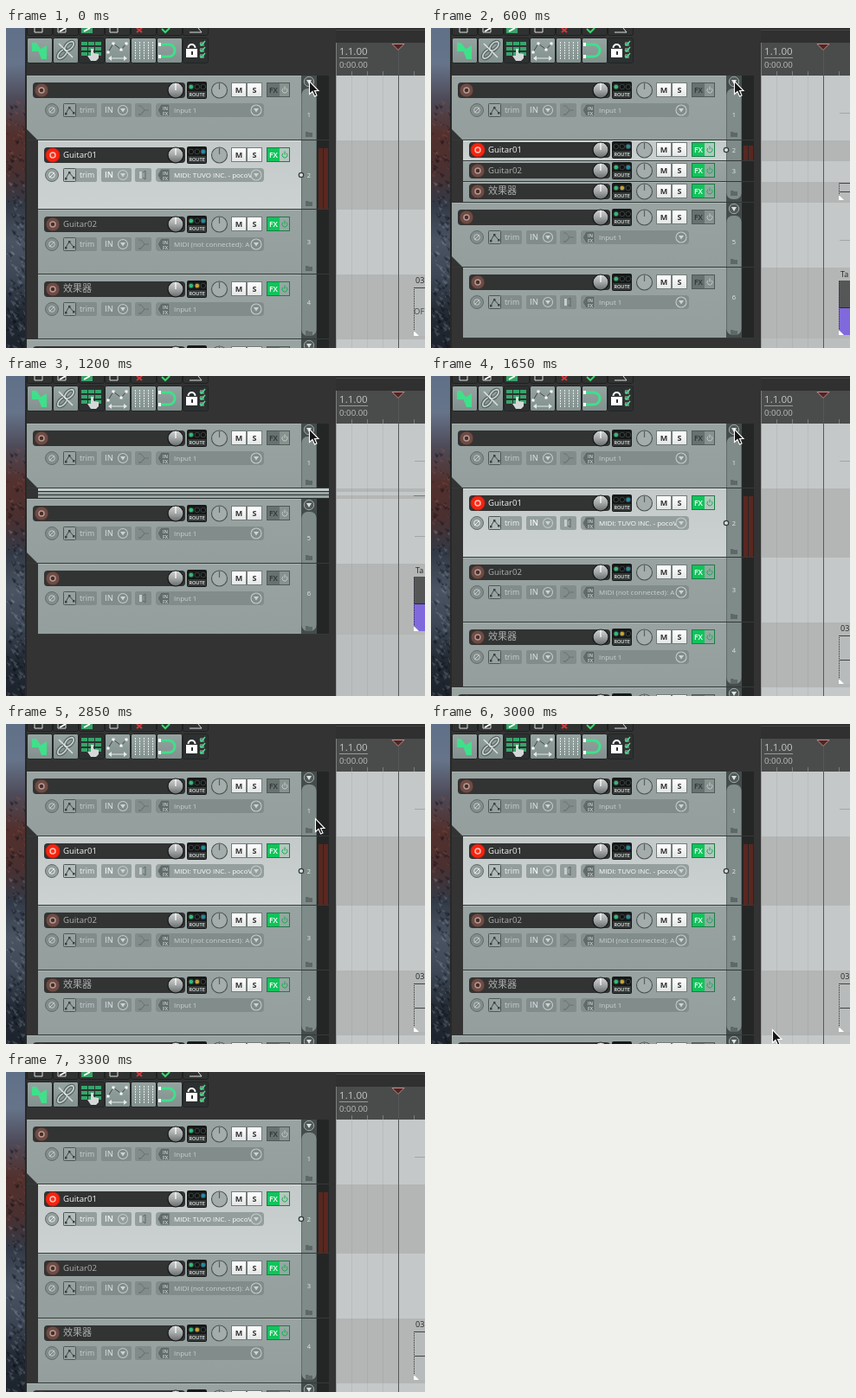
Write an HTML page with a canvas that moves like this. It is 484 px wide and 370 px high and loops after 3750 ms.

```html
<!DOCTYPE html>
<html lang="en">
<head>
<meta charset="utf-8">
<title>Folder track collapse</title>
<style>
html, body { margin: 0; width: 100%; height: 100%; overflow: hidden; background: #333; }
canvas { display: block; width: 484px; height: 370px; }
</style>
</head>
<body>
<canvas id="stage" width="484" height="370"></canvas>
<script>
const c = document.getElementById('stage').getContext('2d');
const SANS = '"Open Sans", "Noto Sans CJK SC", "Noto Sans CJK", "Noto Sans", sans-serif';
const GREEN = '#3fe08a', DARK = '#333';

function rect(x, y, w, h, fill) {
  c.fillStyle = fill;
  c.fillRect(x, y, w, h);
}
function round(x, y, w, h, r, fill, stroke) {
  c.beginPath();
  c.roundRect(x, y, w, h, r);
  paint(fill, stroke);
}
function circle(x, y, r, fill, stroke, width) {
  c.beginPath();
  c.arc(x, y, r, 0, 7);
  paint(fill, stroke, width);
}
function paint(fill, stroke, width = 1) {
  if (fill) { c.fillStyle = fill; c.fill(); }
  if (stroke) { c.strokeStyle = stroke; c.lineWidth = width; c.stroke(); }
}
function path(points, fill, stroke, width) {
  c.beginPath();
  for (let i = 0; i < points.length; i += 2) c.lineTo(points[i], points[i + 1]);
  if (fill) c.closePath();
  paint(fill, stroke, width);
}
function text(s, x, y, size, fill, align = 'left', weight = 400) {
  c.font = `${weight} ${size}px ${SANS}`;
  c.textAlign = align;
  c.fillStyle = fill;
  c.fillText(s, x, y);
}
function shade(y, h, ...colors) {
  const g = c.createLinearGradient(0, y, 0, y + h);
  colors.forEach((col, i) => g.addColorStop(i / (colors.length - 1), col));
  return g;
}

function wallpaper() {
  rect(0, 0, 22, 370, shade(0, 370, '#5f7088', '#66748a', '#4d4a58', '#52302d', '#4a3030',
    '#333a47', '#4a5462', '#3c4654', '#232a34', '#1d232c'));
  let seed = 7;
  const rnd = () => (seed = seed * 16807 % 2147483647) / 2147483647;
  for (let i = 0; i < 220; i++) {
    const x = rnd() * 22, y = 82 + rnd() * 288, s = 2 + rnd() * 5;
    const hue = y < 178 ? '150,85,70' : '135,150,170';
    path([x, y, Math.min(22, x + s), y + s / 2, Math.min(22, x + s / 2), y + s],
      i % 2 ? `rgba(${hue},.28)` : 'rgba(8,12,20,.35)');
  }
  rect(22, 0, 2, 370, '#282828');
}

function link(x, y) {
  c.beginPath();
  c.ellipse(x, y, 6.5, 3.5, -Math.PI / 4, 0, 7);
  paint(null, '#55625f', 4);
  paint(null, '#c3cdcb', 1.8);
}

function toolbar() {
  // Cropped row of buttons above
  for (let i = 0; i < 7; i++) round(24.5 + i * 30, -6, 29, 14.5, 2, '#303232', '#1f2121');
  for (const x of [33, 60, 120]) path([x, 0, x, 5, x + 9, 5, x + 9, 0], null, '#ddd');
  path([62, 4, 69, 0], null, '#fff', 2);
  rect(87, 0, 13, 6, '#3aa267');
  path([90, 4, 97, 0], null, '#fff', 2);
  path([151, 5, 157, 0], null, '#d23838', 2);
  path([151, 0, 157, 5], null, '#d23838', 2);
  path([180, 1, 184, 5, 189, 0], null, '#3bd56e', 2);
  path([212, 5, 226, 5, 222, 0], null, '#ddd');

  for (let i = 0; i < 7; i++) {
    const on = i !== 2 && i !== 6;
    round(24.5 + i * 30, 11.5, 29, 29, 2,
      on ? shade(11, 29, '#96a4a1', '#82908e') : '#2d3030', '#222525');
  }
  path([30, 17, 35, 17, 42, 27, 30, 27], GREEN);
  path([37, 26, 47, 20, 47, 36, 41, 36], GREEN);

  link(65, 30);
  link(73, 21);
  path([61, 18, 77, 34], null, '#dde4e2', 1.5);

  for (let i = 0; i < 9; i++) {
    rect(87 + i % 3 * 8, 16 + (i / 3 | 0) * 6, 7, 4, '#36a56b');
  }
  path([98, 24, 101, 24, 101, 29, 107, 30, 107, 35, 104, 38, 98, 38, 94, 32, 98, 32], '#d4d9d8');

  const nodes = [[118, 28], [124, 18], [133, 25], [139, 18]];
  path(nodes.flat(), null, '#3f4a49', 1);
  for (const [x, y] of nodes) rect(x - 1.5, y - 1.5, 3, 3, '#fff');
  path([119, 35, 139, 35], null, '#e2e9e7');
  path([118, 35, 122, 32, 122, 38], '#e2e9e7');
  path([140, 35, 136, 32, 136, 38], '#e2e9e7');

  for (let i = 0; i < 5; i++)
    for (let y = 16; y < 37; y += 3) rect(149 + i * 5, y, 1, 2, '#e2e9e7');

  c.beginPath();
  c.moveTo(177, 19);
  c.lineTo(188, 19);
  c.arc(188, 26, 7, -Math.PI / 2, Math.PI / 2);
  c.lineTo(177, 33);
  paint(null, GREEN, 3);
  rect(176, 17, 3, 4, '#fff');
  rect(176, 31, 3, 4, '#fff');

  c.beginPath();
  c.arc(214.5, 23, 4, Math.PI, 0);
  paint(null, '#fff', 2);
  rect(208, 24, 13, 10, '#fff');
  rect(214, 27, 2, 4, DARK);
  for (let y = 16; y < 35; y += 7) {
    rect(224, y, 5, 5, '#777');
    path([224, y + 2, 226, y + 4, 230, y - 1], null, GREEN, 1.5);
  }
}

function volumeKnob(x, y) {
  circle(x, y, 9, shade(y - 9, 18, '#d2d4d4', '#a4a7a7', '#686b6b'), '#171919', 1.2);
  path([x, y - 8, x, y], null, '#fff', 1.2);
}
function panKnob(x, y) {
  circle(x, y, 9, '#a4adab', '#4b5352', 1.1);
  path([x, y - 8, x, y - 1], null, '#59615f', 1.2);
}

function recButton(x, y, on) {
  circle(x, y, 8, on ? '#f8220f' : '#6d4c45', on ? '#c92314' : '#46322d');
  circle(x, y, 3, on ? '#f8321f' : '#4b2c28', on ? '#ffc0b5' : '#b39a94', 1.5);
}

function fxButton(y, t) {
  rect(301, y - 9, 27, 17, t.fx ? '#1c7d48' : '#4f5958');
  rect(302, y - 8, 14, 15, t.fx ? '#10c45b' : '#677170');
  rect(316, y - 8, 11, 15, t.fx ? t.sel ? '#b4c8be' : '#93a8a0' : '#87928f');
  text('FX', 309, y + 3.2, 8.7, t.fx ? '#fff' : '#2f3635', 'center', 600);
  const ink = t.fx ? '#14ad55' : '#c3cbc9';
  c.beginPath();
  c.arc(322, y, 3, -.9, 4.04);
  paint(null, ink);
  path([322, y - 4.5, 322, y - .5], null, ink);
}

function topControls(x, y, t) {
  round(x + 7, y - 9, 200 - x, 18, 4, '#323333');
  recButton(x + 17, y, t.sel);
  if (t.name) text(t.name, 66, y + 3.3, t.cjk ? 11 : 9.6, t.sel ? '#f3f3f3' : '#adb0b0');
  volumeKnob(196, y);

  round(209, y - 10, 23, 20, 2, '#161818');
  rect(210, y + 1, 21, 8, '#333837');
  t.dots.forEach((d, i) => circle(213.8 + i * 7, y - 4, 2.8, d, '#3c4241'));
  text('ROUTE', 220.6, y + 7, 5.6, '#e4e8e8', 'center', 600);
  panKnob(246.5, y);

  for (const [s, bx] of [['M', 260], ['S', 278]]) {
    rect(bx, y - 9, 18, 17, '#747c7b');
    rect(bx + 1, y - 8, 16, 15, shade(y - 8, 15, '#fff', '#e4e6e6'));
    text(s, bx + 9, y + 3, 9, '#333', 'center', 700);
  }
  fxButton(y, t);
}

function dropArrow(x, y, r = 5.5) {
  circle(x, y, r, null, '#c3cbc9', 1.1);
  path([x - 3, y - 2, x + 3, y - 2, x, y + 2.5], '#ccd3d2');
}

function lowControls(y, t) {
  const box = t.sel ? '#949e9d' : '#818c8b', ink = t.sel ? '#f4f6f6' : '#cbd2d1';
  const button = (x, w, r = 2) => round(x, y - 8, w, 16, r, box);
  circle(53, y, 7.5, box, '#626d6c');
  circle(53, y, 3.3, null, ink, .9);
  path([50, y + 3, 56, y - 3], null, ink, .9);

  button(66, 39);
  round(66.5, y - 7.5, 14, 15, 1, t.sel ? '#b3bcba' : '#97a2a0', '#4e5857');
  const nodes = [69, y + 4, 73, y - 3, 78, y + 3];
  path(nodes, null, '#414a49');
  for (let i = 0; i < 6; i += 2) rect(nodes[i] - 1, nodes[i + 1] - 1, 2.5, 2.5, '#3a4241');
  text('trim', 85, y + 3, 8.8, ink);

  button(110, 35);
  text('IN', 114, y + 3.3, 9.2, ink, 'left', 600);
  dropArrow(135, y);

  button(149, 19);
  if (t.monitor) {
    rect(154, y - 4, 3, 8, '#c5cdcb');
    path([158, y - 3, 161, y - 5, 161, y + 5, 158, y + 3], null, '#5f6968');
  } else path([153, y - 5, 156, y - 5, 160, y, 156, y + 5, 153, y + 5, 156, y + 5, 160, y, 165, y], null, '#6a7574');

  button(173, 125, 4);
  path([175, y, 179, y - 7, 189, y - 7, 189, y + 7, 179, y + 7], '#616b6a', '#8d9795');
  text('IN', 184, y - .5, 5.4, '#d5dbda', 'center', 600);
  text('FX', 184, y + 5.5, 5.4, '#d5dbda', 'center', 600);
  c.save();
  c.beginPath();
  c.rect(193, y - 8, 90, 16);
  c.clip();
  text(t.input, 194, y + 2.8, 8, t.sel ? '#fff' : ink);
  c.restore();
  dropArrow(289, y, 6);
}

function folderIcon(y) {
  path([346, y - 3, 349, y - 3, 350, y - 2, 354, y - 2, 354, y + 3, 346, y + 3], '#5d6867');
}

function sideBar(t, y, h) {
  rect(341, y, 18, h, '#454d4c');
  const top = t.parent ? y + 15 : y, bottom = y + h - (t.last ? 3 : 0);
  const r1 = t.parent ? 7 : 0, r2 = t.last ? 7 : 0;
  round(341.5, top, 17, bottom - top, [r1, r1, r2, r2], '#7f8b89');
  if (t.parent) {
    circle(350, y + 7, 5.7, '#515a59', '#9ea8a6');
    path([347, y + 5, 353, y + 5, 350, y + 10], '#dde3e1');
  }
  if (h > 30) folderIcon(y + h - 6);
  else if (t.last) folderIcon(y + 13);
  if (h > 30 || !t.last) {
    const ny = h < 30 ? y + 11 : t.parent ? y + 45 : t.n === 6 ? y + 34 : y + h / 2 - (t.last ? 5 : 0);
    text(t.n, 350, ny + 3, 7.5, '#e3e9e7', 'center');
  }
}

function track(t, y, h) {
  const x = t.parent ? 24 : 37, small = h < 30, body = h - 1;
  rect(x, y, 341 - x, body, t.sel ? shade(y, body, '#c3cac9', '#ccd1d1') : shade(y, body, '#98a3a2', '#939e9d'));
  rect(x, y, 341 - x, 1, t.sel ? '#dce1e0' : '#a9b3b1');
  if (t.parent) path([24, y + h - 13, 37, y + h, 24, y + h], DARK);
  sideBar(t, y, body);
  rect(359, y, 14, body, '#242626');
  rect(x, y + body, 373 - x, 1, '#333a39');
  topControls(x, y + (small ? 11 : 17), t);
  if (!small) lowControls(y + 40, t);
  if (t.sel) {
    const top = y + (small ? 6 : 9);
    rect(361, top, 5, y + body - top, '#592720');
    rect(367, top, 5, y + body - top, '#592720');
    circle(341, y + (small ? 11 : 40), 2.7, '#d7dcdb', '#343a39', 1.2);
  }
}

const OFF = '#101313', BLUE = '#238ba3', LIT = '#2fbc75';
const base = { input: 'Input 1', dots: [LIT, OFF, OFF] };
const tracks = [
  { ...base, n: 1, parent: true },
  { n: 2, name: 'Guitar01', sel: true, fx: true, monitor: true, input: 'MIDI: TUVO INC. - pocoV', dots: [OFF, OFF, BLUE] },
  { n: 3, name: 'Guitar02', fx: true, input: 'MIDI (not connected): A', dots: [LIT, OFF, BLUE] },
  { ...base, n: 4, name: '效果器', cjk: true, fx: true, last: true, dots: [LIT, '#c6a337', OFF] },
  { ...base, n: 5, parent: true },
  { ...base, n: 6, monitor: true, last: true }
];
const layouts = {
  full: [75, 80, 75, 75, 75, 81],
  small: [75, 24, 24, 24, 75, 82],
  hidden: [75, 4, 4, 4, 75, 82]
};

function clip(y, h, midline) {
  rect(471, y, 13, h, '#b8bbbb');
  for (let i = 0; i < h; i += 2) rect(471, y + i, 1, 1, '#333');
  rect(471, y, 13, 1, '#444');
  if (midline) rect(471, y + (h >> 1), 13, 1, '#444');
  path([471, y + h - 6, 477, y + h, 471, y + h], '#fff');
}

function ruler() {
  rect(381, 0, 103, 17, '#303030');
  rect(381, 2, 103, 1, '#454545');
  rect(381, 17, 103, 38, '#4a4b4b');
  text('1.1.00', 385, 30.5, 11.6, '#c4c4c4');
  rect(385, 34, 33, 1, '#989898');
  text('0:00.00', 385, 46, 9.7, '#bdbdbd');
  for (let x = 381; x < 484; x += 18) rect(x, x === 381 ? 17 : 50, 1, x === 381 ? 38 : 5, '#7b7d7d');
  path([446, 18.5, 460, 18.5, 453, 25.5], '#4f2624', '#b98d89');
}

function band(i, y, h, mode, first) {
  rect(381, y, 103, h, i % 2 ? '#b4b6b6' : '#c5c8c8');
  if (i === 0 && !first || i === 4) rect(472, y + 43, 12, 1, '#a3a6a6');
  if (i === 3) {
    if (mode === 'full') {
      clip(y + 15, 56, !first);
      text('03', 473, y + 10, 9, '#222');
      if (first) text('OF', 471, y + 46, 9.5, '#444');
    } else if (mode === 'small') clip(y + 1, 20, true);
    else rect(471, y, 13, 1, '#777');
  }
  if (i === 5) {
    text('Ta', 473, y + 11, 9, '#222');
    rect(471, y + 15, 13, 31, '#555757');
    rect(471, y + 46, 13, 1, '#292b2b');
    rect(471, y + 47, 13, 31, '#8069dc');
    for (let d = 16; d < 78; d += 2) rect(471, y + d, 1, 1, '#302b43');
    path([471, y + 72, 477, y + 78, 471, y + 78], '#fff');
  }
}

function cursor(x, y) {
  const shape = [0, 0, 0, 15, 3.5, 12, 6, 17.5, 8.5, 16.5, 6, 11, 10.5, 11, 0, 0];
  path(shape.map((v, i) => v + (i % 2 ? y : x) + .5), '#151515', '#fff', 1.1);
}

function draw(t) {
  const mode = t < 600 || t >= 1650 ? 'full' : t < 1200 ? 'small' : 'hidden';
  rect(0, 0, 484, 370, DARK);
  wallpaper();
  toolbar();
  rect(381, 55, 103, 315, '#bbbebe');
  let y = 55;
  layouts[mode].forEach((h, i) => {
    if (y < 370) {
      band(i, y, h, mode, t < 600);
      if (h > 4) track(tracks[i], y, h);
      else {
        rect(37, y, 336, 3, i === 1 ? '#c4cccb' : '#98a4a2');
        rect(37, y + 3, 336, 1, '#272e2d');
      }
    }
    y += h;
  });
  for (let x = 399; x < 471; x += 18) rect(x, 55, 1, 315, 'rgba(50,55,55,.07)');
  rect(381, 55, 1, 315, '#9a9d9d');
  ruler();
  rect(453, 26, 1, 344, '#555858');
  if (t < 2850) cursor(350, 61);
  else if (t < 3000) cursor(357, 109);
  else if (t < 3150) cursor(394, 353);
  else if (t < 3300) cursor(398, 356);
}

const start = performance.now();
function tick() {
  draw((performance.now() - start) % 3750);
  requestAnimationFrame(tick);
}
tick();
</script>
</body>
</html>
```
